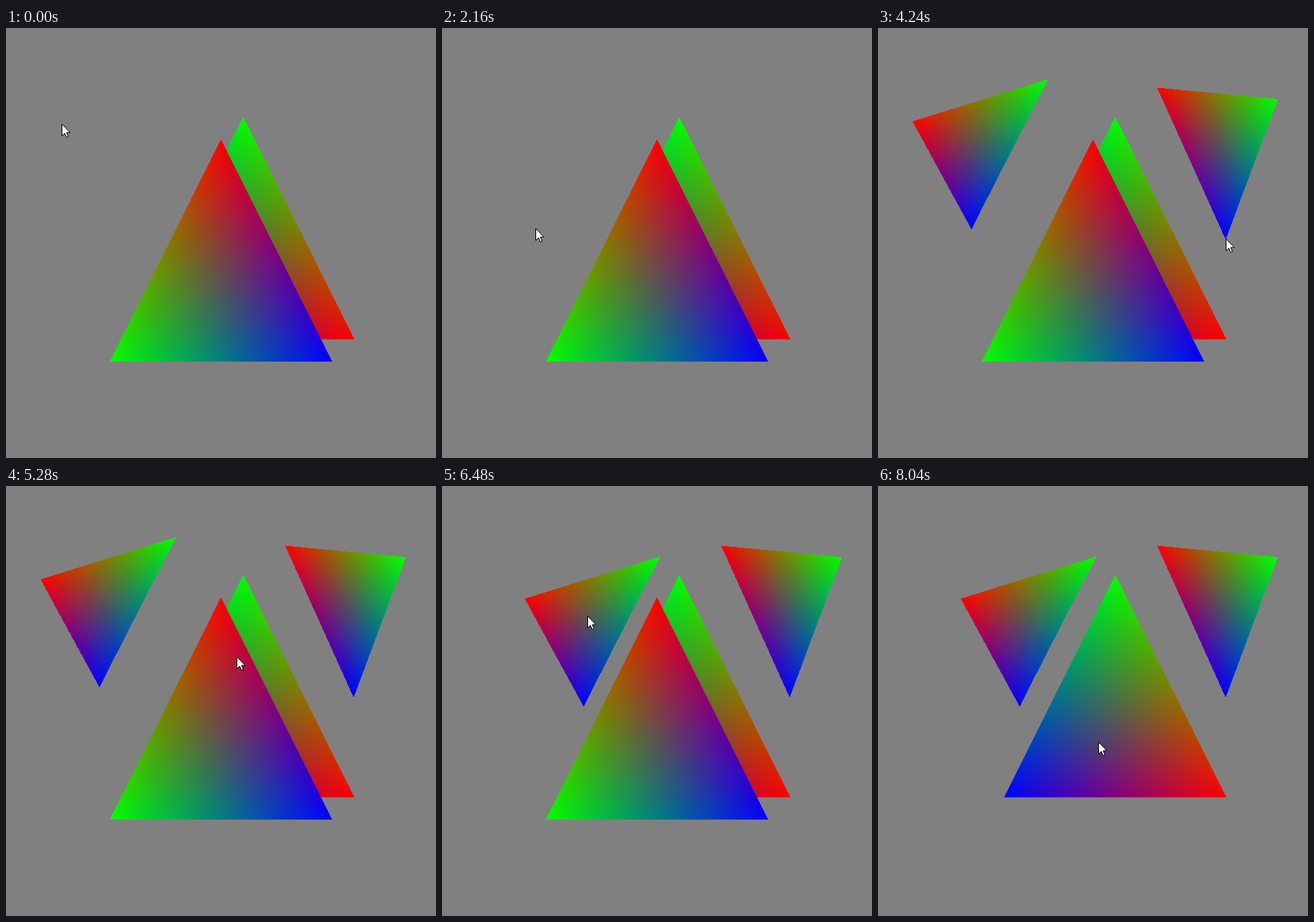
Animation, 580 px wide and 580 px high, one loop 8.6 s. Source, as an HTML page with a canvas:

```html
<!DOCTYPE html>
<html lang="en">
<head>
<meta charset="utf-8">
<title>Triangle editor</title>
<style>
  html, body { margin: 0; width: 100%; height: 100%; overflow: hidden; background: #808080; }
  canvas { display: block; }
</style>
</head>
<body>
<canvas id="stage" width="580" height="580"></canvas>
<script>
const LOOP = 8600, SIZE = 580;
const ctx = document.getElementById('stage').getContext('2d');

// Pointer moves: start, end, target x, target y, easing
const smooth = f => f * f * (3 - 2 * f);
const linear = f => f;
const speedUp = f => f * f;
const HOME = [75, 129];
const MOVES = [
  [640, 960, 47, 125, smooth],
  [1160, 1520, 229, 69, smooth],
  [1640, 2040, 126, 270, smooth],
  [2520, 2920, 474, 110, smooth],
  [2960, 3240, 419, 81, speedUp],
  [3240, 3320, 377, 80, linear],
  [3360, 3640, 539, 96, smooth],
  [3760, 4040, 469, 284, smooth],
  [5000, 5600, 119, 165, smooth],
  [5600, 5880, 131, 149, smooth],
  [5960, 6400, 196, 175, smooth],
  [7400, 7440, 242, 203, linear],
  [7440, 7840, 297, 345, smooth]
];

// Button held: from, to
const PRESSES = [
  [1040, 1200], [1560, 1640], [2120, 2160], [3320, 3360],
  [3720, 3760], [4120, 4160], [5960, 6480], [7920, 7960]
];

// Vertices in the order red, green, blue; shown between from and to
const SHAPES = [
  { pts: [[470, 420], [320, 120], [170, 420]], from: 0, to: LOOP },
  { pts: [[290, 150], [140, 450], [440, 450]], from: 0, to: 8040 },
  { pts: [[46.5, 126], [229.5, 69], [126, 271.5]], from: 2240, to: LOOP, drag: true },
  { pts: [[376.5, 80.5], [539.5, 96], [469, 285.5]], from: 4240, to: LOOP }
];

const ARROW = new Path2D('M.5 .5V16.5L4.2 13L6.7 18.5L9 17.6L6.7 12H11.5Z');

// Shade a triangle by barycentric weights, with hard edges
function shade([a, b, c]) {
  const layer = document.createElement('canvas');
  layer.width = layer.height = SIZE;
  const g = layer.getContext('2d');
  const img = g.createImageData(SIZE, SIZE);
  const cross = (p, q, x, y) => (q[0] - p[0]) * (y - p[1]) - (q[1] - p[1]) * (x - p[0]);
  const area = cross(a, b, c[0], c[1]);
  for (let y = 0, i = 0; y < SIZE; y++) {
    for (let x = 0; x < SIZE; x++, i += 4) {
      const w = [[b, c], [c, a], [a, b]].map(([p, q]) => cross(p, q, x + .5, y + .5) / area);
      if (Math.min(...w) < 0) continue;
      w.forEach((v, k) => { img.data[i + k] = v * 255; });
      img.data[i + 3] = 255;
    }
  }
  g.putImageData(img, 0, 0);
  return layer;
}
for (const s of SHAPES) s.layer = shade(s.pts);

// The screen refreshes 15 times a second, on a 40 ms grid
function tick(t) {
  const base = t >= 4800 && t < 7000 ? 80 : 40;
  const u = (t - base + 200) % 200;
  return t - u + (u >= 120 ? 120 : u >= 80 ? 80 : 0);
}

function pointer(t) {
  let [x, y] = HOME;
  for (const [start, end, tx, ty, ease] of MOVES) {
    if (t <= start) break;
    const f = ease(Math.min(1, (t - start) / (end - start)));
    x += (tx - x) * f;
    y += (ty - y) * f;
  }
  return [Math.round(x), Math.round(y)];
}

const GRAB = pointer(5960), DROP = pointer(6400);

function draw(t) {
  const [x, y] = pointer(tick(t));
  ctx.fillStyle = '#808080';
  ctx.fillRect(0, 0, SIZE, SIZE);

  for (const s of SHAPES) {
    if (t < s.from || t >= s.to) continue;
    let dx = 0, dy = 0;
    if (s.drag && t >= 5960) {
      const [px, py] = t < 6400 ? [x, y] : DROP;
      dx = px - GRAB[0];
      dy = py - GRAB[1];
    }
    ctx.drawImage(s.layer, dx, dy);
  }

  ctx.save();
  ctx.translate(x, y);
  ctx.fillStyle = '#fff';
  ctx.fill(ARROW);
  ctx.strokeStyle = '#000';
  ctx.lineWidth = 1;
  ctx.stroke(ARROW);
  if (PRESSES.some(([on, off]) => t >= on && t < off)) {
    ctx.fillStyle = 'rgba(255, 255, 0, .47)';
    ctx.beginPath();
    ctx.arc(0, 0, 15, 0, Math.PI * 2);
    ctx.fill();
  }
  ctx.restore();
}

const begin = performance.now();
function loop() {
  draw((performance.now() - begin) % LOOP);
  requestAnimationFrame(loop);
}
loop();
</script>
</body>
</html>
```
